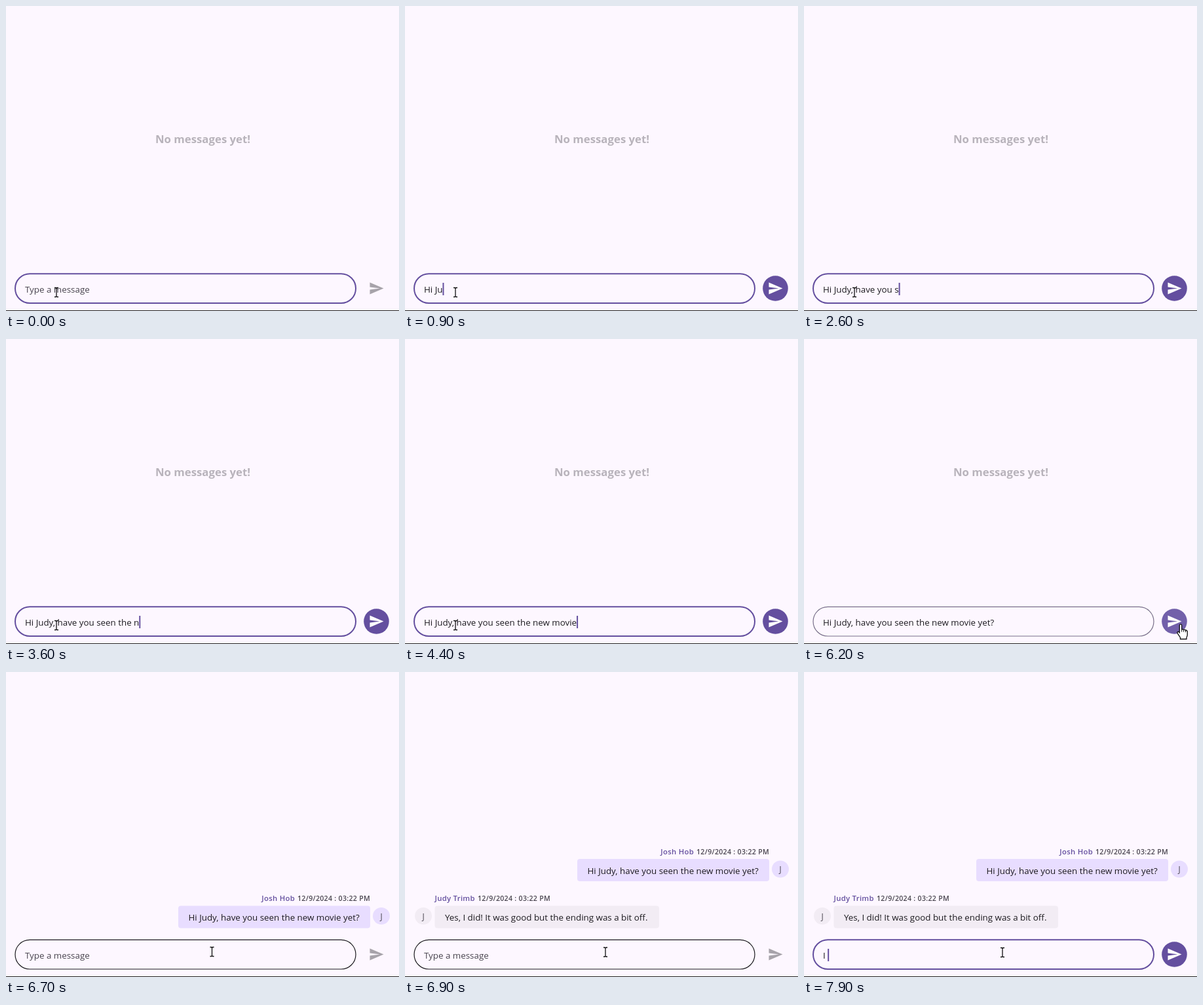
Animation of 600 by 465 pixels, one loop 8000 ms. Source, as an HTML page with a canvas:

```html
<!DOCTYPE html>
<html lang="en">
<head>
<meta charset="utf-8">
<title>Chat</title>
<style>
  html, body { margin: 0; width: 600px; height: 465px; overflow: hidden; background: #fdf7ff; }
  canvas { display: block; }
</style>
</head>
<body>
<canvas id="stage" width="600" height="465"></canvas>
<script>
const ctx = document.getElementById('stage').getContext('2d');
const LOOP = 8000, STEP = 100;
const SEND = 6300, REPLY = 6900, BLUR = 6100, REFOCUS = 7000;
const PURPLE = '#644f9f', INK = '#1d1b20', MUTED = '#49454f';
const OWN = '#e8ddff', OTHER = '#f2ecf4';
const FONT = '"Open Sans", "Noto Sans", sans-serif';
const BODY = '13.35px ' + FONT;

const QUESTION = 'Hi Judy, have you seen the new movie yet?';
const ANSWER = 'Yes, I did! It was good but the ending was a bit off.';
const STAMP = '12/9/2024 : 03:22 PM';

// Moments of the key presses, in tenths of a second
const span = (from, to) => Array.from({ length: to - from + 1 }, (_, i) => from + i);
const keys = [3, 4, 6, 8, 9, 10, 10, 15, 16, 16, ...span(17, 17), ...span(19, 24), 24,
  ...span(26, 34), ...span(36, 44), 46, ...span(51, 54)].map(k => k * 100);
const laterKeys = [7600, 7800];

// Pointer path: time, x, y
const path = [[5600, 77, 436.5], [5800, 210, 433], [6000, 545, 438], [6100, 575, 435],
  [6300, 575, 435], [6400, 548, 431], [6500, 548, 431], [6600, 400, 428],
  [6700, 314.5, 426.5], [6900, 306, 427], [7000, 303, 427.5]];

const sendIcon = new Path2D('M2 21L23 12 2 3V10L17 12 2 14Z');
const handShape = new Path2D('M-1.7 1.5a1.7 1.7 0 0 1 3.4 0v6l6 1.2q2.6.7 2.6 3v4.3q0 2-1.3 4v2.5h-9.5v-2.3l-4.3-6.6q-.8-1.6.6-2.3 1.2-.4 2.5 1.3z');
const handLines = new Path2D('M1.7 7.5v4M4.7 8.3v3.4M7.5 8.9v3.2');
const arrowShape = new Path2D('M0 0V16L3.7 12.5 6.2 18 8.6 17 6.2 11.5H11Z');
const beamShape = new Path2D('M-3 -7H-1L0 -6 1 -7H3M0 -6V6M-3 7H-1L0 6 1 7H3');

function text(str, x, y, font, color, align = 'left', spacing = 0) {
  ctx.font = font;
  ctx.fillStyle = color;
  ctx.textAlign = align;
  ctx.letterSpacing = spacing + 'px';
  ctx.fillText(str, x, y);
  ctx.letterSpacing = '0px';
}

function box(x, y, w, h, r) {
  ctx.beginPath();
  ctx.roundRect(x, y, w, h, r);
}

function disc(x, y, r, color) {
  ctx.beginPath();
  ctx.arc(x, y, r, 0, 7);
  ctx.fillStyle = color;
  ctx.fill();
}

function message({ name, nameX, nameAlign, stampX, x, w, avatarX, color, body }, dy) {
  text(name, nameX, 349 + dy, '600 11.3px ' + FONT, PURPLE, nameAlign, 0.3);
  text(STAMP, stampX, 349 + dy, '600 10.6px ' + FONT, MUTED, 'left', 0.3);
  box(x, 356.5 + dy, w, 34, 4);
  ctx.fillStyle = color;
  ctx.fill();
  text(body, x + 15.5, 379 + dy, BODY, INK);
  disc(avatarX, 372 + dy, 13, color);
  text('J', avatarX, 376.5 + dy, '12px ' + FONT, MUTED, 'center');
}

const own = { name: 'Josh Hob', nameX: 441, nameAlign: 'right', stampX: 445, x: 263,
  w: 293, avatarX: 573, color: OWN, body: QUESTION };
const reply = { name: 'Judy Trimb', nameX: 45.5, nameAlign: 'left', stampX: 111, x: 45.5,
  w: 342.5, avatarX: 28, color: OTHER, body: ANSWER };

function pointerAt(t) {
  const next = path.findIndex(p => p[0] > t);
  if (next === 0) return path[0].slice(1);
  if (next < 0) return path.at(-1).slice(1);
  const [t0, x0, y0] = path[next - 1], [t1, x1, y1] = path[next];
  const k = (t - t0) / (t1 - t0);
  return [x0 + (x1 - x0) * k, y0 + (y1 - y0) * k];
}

function drawPointer(x, y, overField, active) {
  ctx.save();
  ctx.translate(x, y);
  ctx.lineWidth = 1.3;
  ctx.strokeStyle = '#111';
  ctx.fillStyle = '#fff';
  if (overField) {
    ctx.stroke(beamShape);
  } else if (active) {
    ctx.fill(handShape);
    ctx.stroke(handShape);
    ctx.lineWidth = 1;
    ctx.stroke(handLines);
  } else {
    ctx.fill(arrowShape);
    ctx.lineWidth = 1;
    ctx.stroke(arrowShape);
  }
  ctx.restore();
}

function drawField(t, value, focused, hovered) {
  box(14, 408.3, 520, 44.7, 22.3);
  ctx.lineWidth = focused ? 2 : 1.2;
  ctx.strokeStyle = focused ? PURPLE : hovered ? INK : '#79708a';
  ctx.stroke();
  text(value || 'Type a message', 29, 436.5, BODY, value ? INK : MUTED);

  const pressed = [-700, ...keys, REFOCUS, ...laterKeys].filter(k => k <= t).at(-1);
  const idle = (t - pressed) % 1000;
  if (focused && (idle < 300 || idle >= 800)) {
    ctx.fillStyle = PURPLE;
    ctx.fillRect(29 + (value ? ctx.measureText(value).width : 0), 422, 2, 19);
  }
}

function drawButton(active, hovered) {
  if (active) disc(565.5, 430.5, 19.3, hovered ? '#7260aa' : PURPLE);
  ctx.save();
  ctx.translate(553.5, 418.5);
  ctx.fillStyle = active ? '#fff' : '#a7a3aa';
  ctx.fill(sendIcon);
  ctx.restore();
}

function draw(t) {
  const typed = t < SEND ? [QUESTION, keys] : ['I ', laterKeys];
  const value = typed[0].slice(0, typed[1].filter(k => k <= t).length);
  const [px, py] = pointerAt(t);
  const overField = px < 535;

  ctx.fillStyle = '#fdf7ff';
  ctx.fillRect(0, 0, 600, 465);
  if (t < SEND) text('No messages yet!', 300.5, 209, '700 16.8px ' + FONT, '#b8b3bb', 'center');
  else message(own, t < REPLY ? 0 : -71.5);
  if (t >= REPLY) message(reply, 0);

  drawField(t, value, t < BLUR || t >= REFOCUS, overField);
  drawButton(value !== '', px > 546);
  ctx.fillStyle = '#222';
  ctx.fillRect(0, 464, 600, 1);
  drawPointer(px, py, overField, value !== '');
}

const start = performance.now();
function tick() {
  const t = (performance.now() - start) % LOOP;
  draw(Math.floor(t / STEP) * STEP);
  requestAnimationFrame(tick);
}
tick();
</script>
</body>
</html>
```
